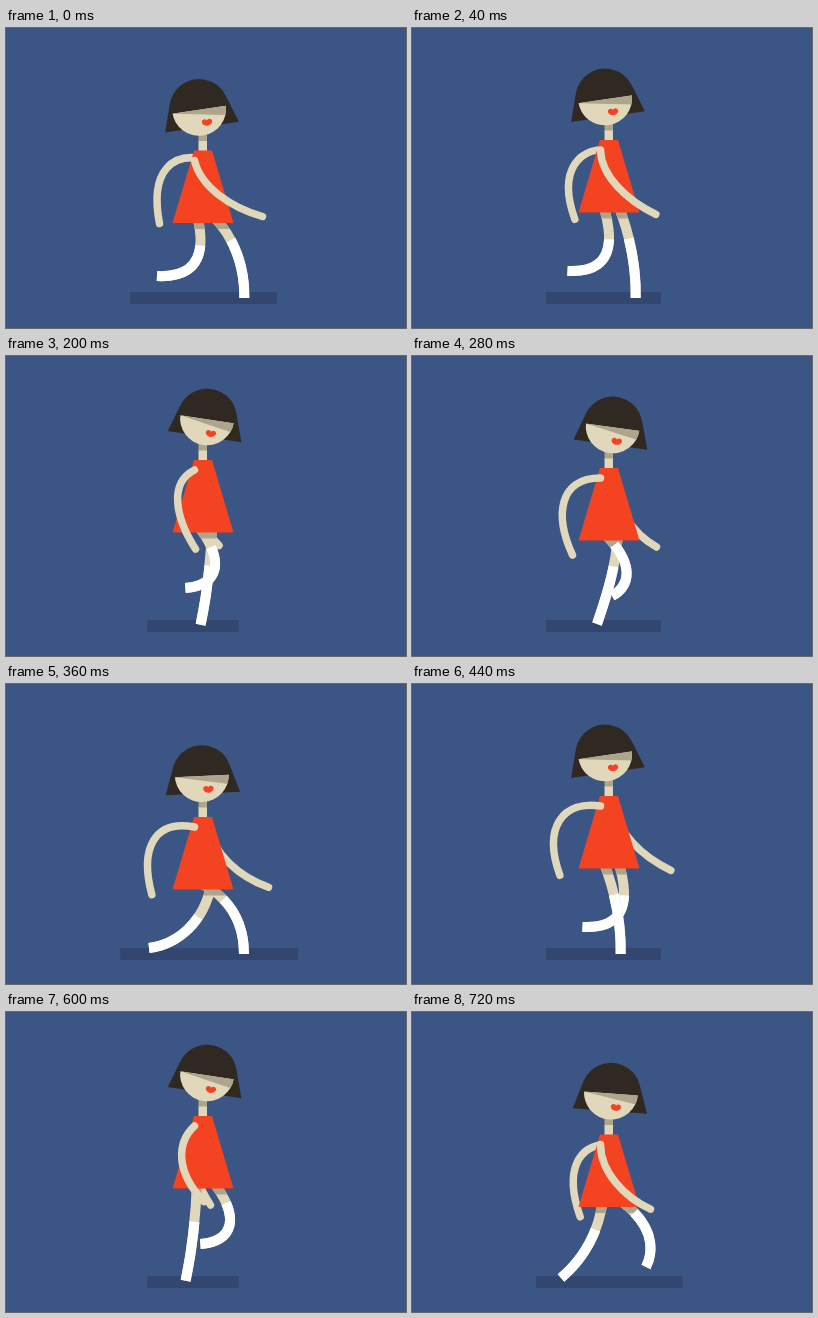
Recreate the animation shown at these times as an HTML page with a canvas. Size 400x300 px, loop 760 ms.

```html
<!DOCTYPE html>
<html lang="en">
<head>
<meta charset="utf-8">
<title>Walk cycle</title>
<style>
  html, body { margin: 0; height: 100%; overflow: hidden; background: #3b5584; }
  canvas { display: block; }
</style>
</head>
<body>
<canvas id="stage" width="400" height="300"></canvas>
<script>
const ctx = document.getElementById('stage').getContext('2d');
const STEP_MS = 40, STEPS = 19, CYCLE = 20, STRIDE = CYCLE / 2;
const FAR_ARM = 15, FAR_LEG = -15, HEM = 72.5, SOCK = 60;
const COLOR = {
  back: '#3b5584', ground: '#32466f', skin: '#e1d8bb', shade: '#aea58c',
  hair: '#2f2922', red: '#f44320', sock: '#ffffff'
};

// Key poses by phase of the cycle. Arm: two controls and hand, from the shoulder.
const ARM = [
  { at: 0, pose: [6, 26, 36, 47, 68, 56] },        // forward
  { at: 3, pose: [-10, 26, 8, 58, 30, 81] },       // dropping
  { at: 7, pose: [-42, 0, -46, 38, -28, 77] },     // behind
  { at: 10, pose: [-38, -11, -60, 11, -50, 63] },  // back
  { at: 13, pose: [-34, 6, -55, 38, -22, 82] },    // returning
  { at: 17, pose: [-3, 28, 18, 56, 41, 69] }       // swinging out
];

// Leg: foot and two controls towards the hip, on the stage.
const LEG = [
  { at: 2, pose: [209, 270, 210, 240, 206, 205] },  // stand
  { at: 7, pose: [185, 268, 194, 242, 204, 212] },  // lean
  { at: 9, pose: [143, 264, 168, 261, 198, 242] },  // push off
  { at: 10, pose: [166, 248, 202, 250, 217, 231] }, // kick
  { at: 14, pose: [184, 228, 225, 229, 233, 204] }, // fold
  { at: 17, pose: [215, 240, 233, 230, 239, 208] }, // pass
  { at: 19, pose: [253, 270, 253, 244, 243, 214] }  // reach
];

const wrap = phase => (phase + CYCLE) % CYCLE;

function poseAt(keys, phase) {
  const i = Math.max(0, keys.findIndex(key => key.at > phase));
  const prev = keys.at(i - 1), next = keys[i];
  const t = wrap(phase - prev.at) / wrap(next.at - prev.at);
  return prev.pose.map((v, j) => v + (next.pose[j] - v) * t);
}

// A soft rise around mid-stride, a steep drop into each step.
function bodyTop(step) {
  const d = Math.abs(step % STRIDE - 4);
  return 103 + Math.max(d * d, 10.5 * d - 22.5);
}

function headTilt(step) {
  const a = (step - 5.5) / STRIDE * Math.PI * 2;
  return (2 + 9 * Math.cos(a) - 2.2 * Math.cos(2 * a)) * Math.PI / 180;
}

function rect(color, x, y, w, h) {
  ctx.fillStyle = color;
  ctx.fillRect(x, y, w, h);
}

function polygon(color, ...points) {
  ctx.fillStyle = color;
  ctx.beginPath();
  for (const [x, y] of points) ctx.lineTo(x, y);
  ctx.fill();
}

function limb(color, width, cap, x, y, ...curve) {
  ctx.strokeStyle = color;
  ctx.lineWidth = width;
  ctx.lineCap = cap;
  ctx.beginPath();
  ctx.moveTo(x, y);
  ctx.bezierCurveTo(...curve);
  ctx.stroke();
}

function drawArm(phase, dx, top) {
  ctx.save();
  ctx.translate(188.5 + dx, top + 10);
  limb(COLOR.skin, 7.5, 'round', 0, 0, ...poseAt(ARM, phase));
  ctx.restore();
}

function drawLeg(phase, dx, hem) {
  const curve = [...poseAt(LEG, phase), 206, hem - 8];
  ctx.save();
  ctx.translate(dx, 0);
  limb(COLOR.skin, 10, 'butt', ...curve);
  ctx.save();
  ctx.beginPath();
  ctx.rect(0, 0, 400, hem + 6);
  ctx.clip();
  limb(COLOR.shade, 10, 'butt', ...curve);
  ctx.restore();
  ctx.setLineDash([SOCK, 999]);
  limb(COLOR.sock, 10, 'butt', ...curve);
  ctx.restore();
}

function drawHead(top, tilt) {
  ctx.save();
  ctx.translate(197, top - 15);
  ctx.rotate(tilt);
  ctx.translate(0, -27);

  ctx.fillStyle = COLOR.hair;
  ctx.beginPath();
  ctx.moveTo(-37, 18.5);
  ctx.arc(0, 0, 29.7, Math.PI * 1.098, -Math.PI * 0.098);
  ctx.lineTo(37.5, 18.5);
  ctx.fill();

  ctx.save();
  ctx.beginPath();
  ctx.arc(0, 0, 27, 0, Math.PI * 2);
  ctx.clip();
  rect(COLOR.skin, -28, 1, 56, 28);
  polygon(COLOR.shade, [-27, 1], [28, 1], [28, 10.5]);
  ctx.restore();

  ctx.translate(6, 14.5);
  ctx.fillStyle = COLOR.red;
  ctx.beginPath();
  for (const side of [1, -1]) {
    ctx.moveTo(0, -2);
    ctx.bezierCurveTo(side * 2, -4.5, side * 5.4, -3, side * 5.2, -0.3);
    ctx.bezierCurveTo(side * 4.8, 2.2, side * 2, 3.4, 0, 3.4);
  }
  ctx.fill();
  ctx.restore();
}

function draw(step) {
  const opposite = wrap(step + STRIDE);
  const top = bodyTop(step), hem = top + HEM, drop = top - 112;

  rect(COLOR.back, 0, 0, 400, 300);
  const left = 134 - drop * 0.94, right = 249 + drop * 2.05;
  rect(COLOR.ground, left, 264, right - left, 12);

  drawArm(opposite, FAR_ARM, top);
  drawLeg(step, 0, hem);
  drawLeg(opposite, FAR_LEG, hem);

  rect(COLOR.skin, 192.5, top - 10, 8.5, 11);
  rect(COLOR.shade, 192.5, top - 22, 8.5, 12.5);
  polygon(COLOR.red, [188, top], [206, top], [227.5, hem], [166.5, hem]);
  drawArm(step, 0, top);
  drawHead(top, headTilt(step));
}

function tick() {
  draw(Math.floor(performance.now() / STEP_MS) % STEPS);
  requestAnimationFrame(tick);
}
tick();
</script>
</body>
</html>
```
